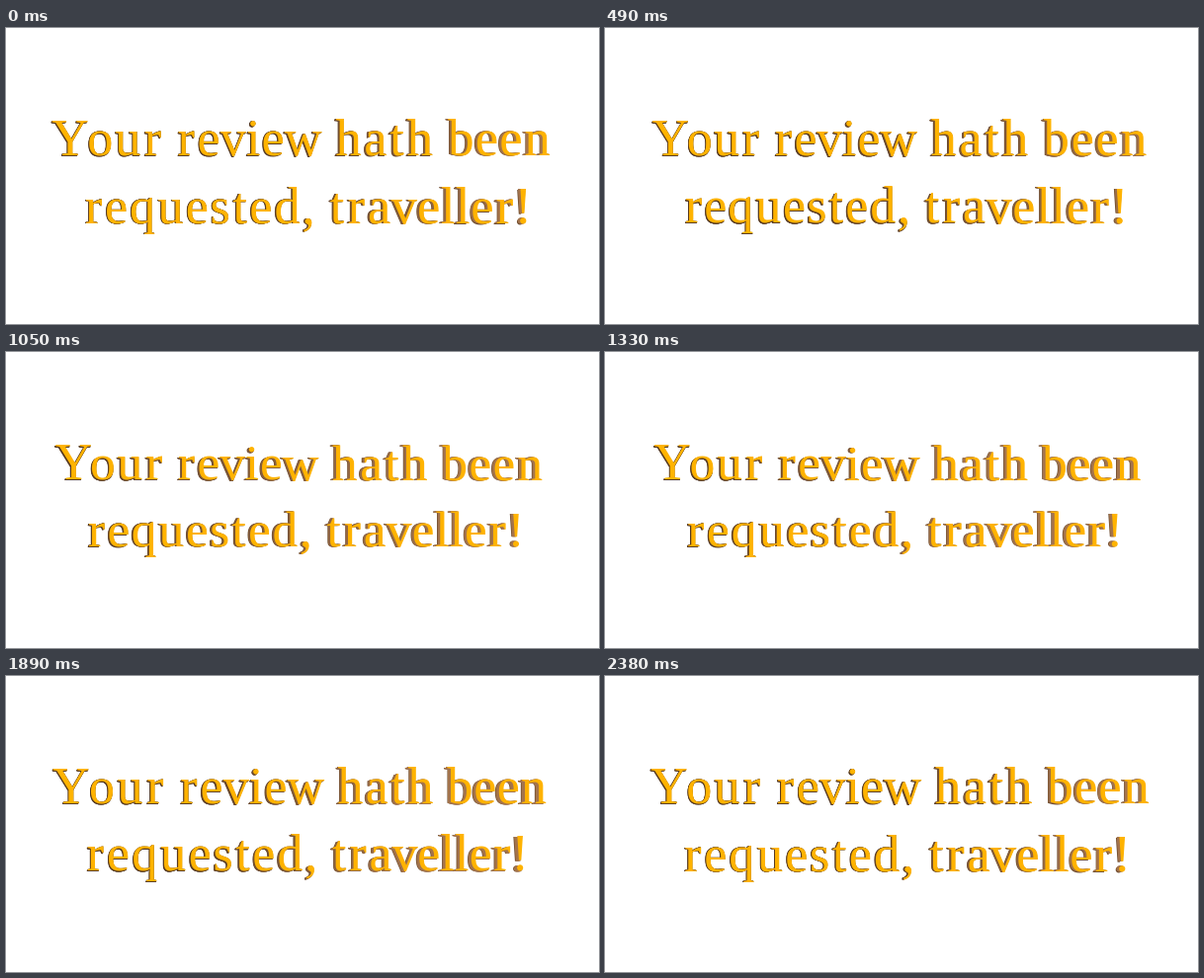
Animation, 600 px wide and 300 px high, one loop 2.45 s. Source, as an HTML page:

```html
<!DOCTYPE html>
<html lang="en">
<head>
<meta charset="utf-8">
<title>Review requested</title>
<style>
  html, body { margin: 0; width: 100%; height: 100%; overflow: hidden; background: #fff; }
  svg { display: block; width: 600px; height: 300px; }
  text { font: 52px "Liberation Serif", serif; text-anchor: middle; }
</style>
</head>
<body>
<svg id="stage" viewBox="0 0 600 300"></svg>
<script>
const LOOP = 2450, STEP = 70;
const EM = 48, GAP = 1.2, LAYERS = 5;
const FACE = '#ffb300', DARK = [88, 60, 36], TAN = [164, 116, 76];
const LINES = [
  { str: 'Your review hath been', x: 50, y: 129.3 },
  { str: 'requested, traveller!', x: 80, y: 197.3 }
];
// advance widths in em
const ADV = {
  Y: .67, o: .539, u: .575, r: .41, ' ': .241, e: .484, v: .497, i: .293, w: .738,
  h: .582, a: .504, t: .346, b: .56, n: .591, q: .559, s: .432, d: .574,
  ',': .27, l: .287, '!': .331
};

const stage = document.getElementById('stage');
const add = (tag, parent) =>
  parent.appendChild(document.createElementNS('http://www.w3.org/2000/svg', tag));
const sides = add('g', stage), faces = add('g', stage);

function glyph(ch, parent) {
  const el = add('text', parent);
  el.textContent = ch;
  return el;
}

const letters = [];
for (const { str, x: left, y } of LINES) {
  let x = left;
  for (const ch of str) {
    const w = ADV[ch] * EM;
    if (ch !== ' ') {
      const side = Array.from({ length: LAYERS }, () => glyph(ch, sides));
      const face = glyph(ch, faces);
      face.setAttribute('fill', FACE);
      letters.push({ x: x + w / 2, y, side, face });
    }
    x += w + GAP;
  }
}

const mix = (a, b, k) => `rgb(${a.map((v, i) => Math.round(v + (b[i] - v) * k))})`;

function place(el, x, y, s) {
  el.setAttribute('transform',
    `translate(${x.toFixed(2)} ${y.toFixed(2)}) scale(${s.toFixed(4)})`);
}

// a bend travels along the text while it sways in perspective
function draw(ms) {
  const a = Math.floor(ms % LOOP / STEP) * STEP / LOOP * 2 * Math.PI;
  const c = Math.cos(a), n = Math.sin(a);
  for (const { x, y, side, face } of letters) {
    const u = (x - 298) / 250;
    const sway = (.9 + 3.1 * u + .3 * u * u) * c + (4.1 * u * u - 3.1) * n;
    const shorten = 1.5 * (1 + u) ** 2;
    const scale = 1 + (.011 + .006 * u) * c;
    const depth = Math.max(.9, 2.1 + 1.6 * u + .6 * Math.cos(a - 3.5 - u));
    const px = x + sway - shorten, py = 150 + (y - 150) * scale;
    const lit = Math.min(1, Math.max(0, (depth - 1.2) / 2));
    side.forEach((el, i) => {
      const k = 1 - i / LAYERS;
      place(el, px + depth * (.5 - k), py + .5 * k, scale);
      el.setAttribute('fill', mix(DARK, TAN, i ? lit : lit * .3));
    });
    place(face, px + depth * .5, py, scale);
  }
}

const start = performance.now();
function tick(now) {
  draw(Math.max(0, now - start));
  requestAnimationFrame(tick);
}
draw(0);
requestAnimationFrame(tick);
</script>
</body>
</html>
```
